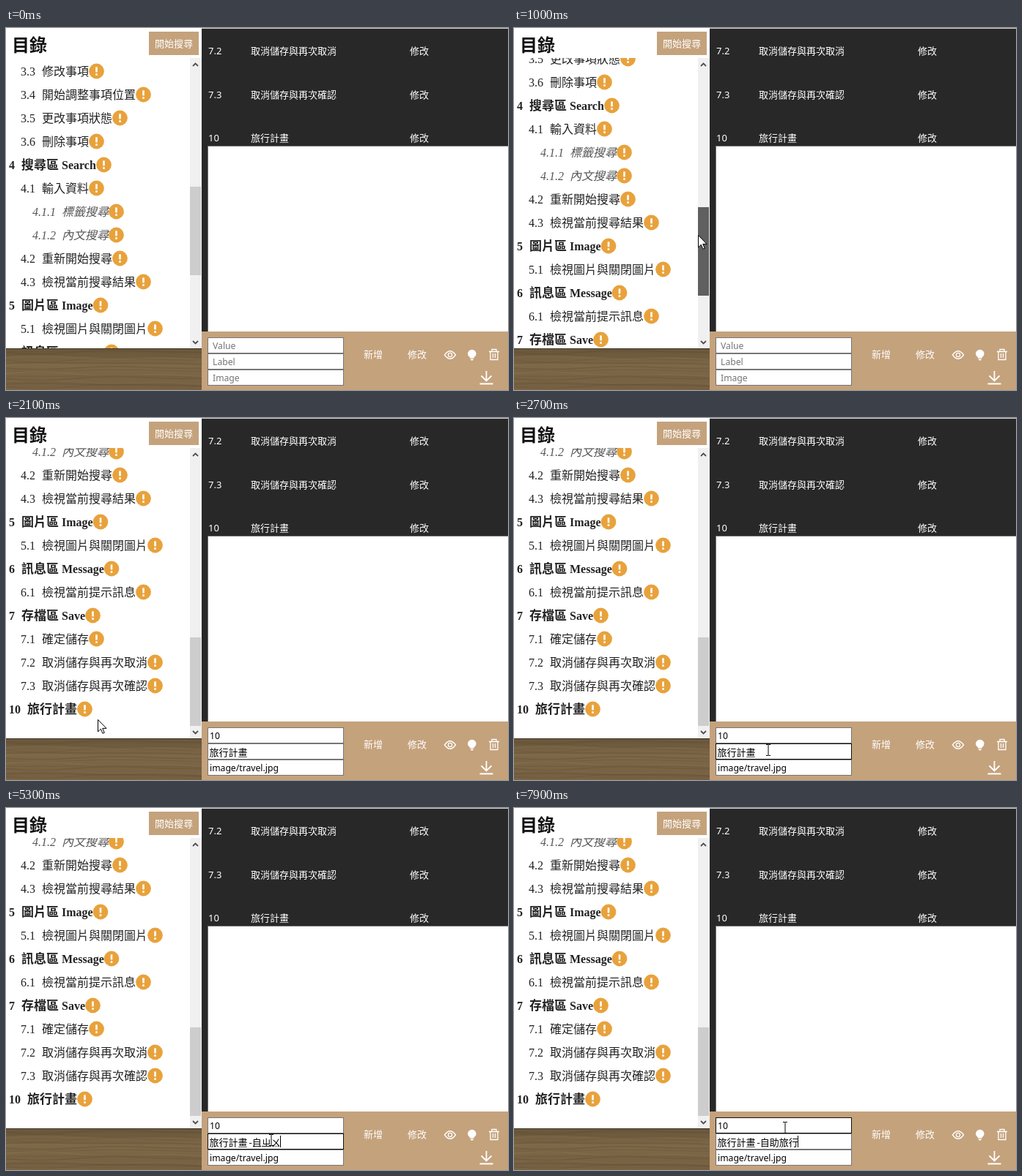
Recreate the animation shown at these times as an HTML page. Size 685 px wide and 495 px high, loop 8000 ms.

```html
<!DOCTYPE html>
<html lang="zh-TW">
<head>
<meta charset="utf-8">
<style>
html, body { margin: 0; width: 100%; height: 100%; overflow: hidden; background: #fff; }
svg { display: block; width: 685px; height: 495px; }
text { font: 13px "Noto Sans", "Noto Sans CJK TC", "Noto Sans CJK", sans-serif; white-space: pre; }
.serif { font: 16px "Liberation Serif", "Noto Sans CJK TC", "Noto Sans CJK", serif; fill: #222; }
.l1 { font-weight: bold; }
.l1 .han { font-size: 17px; }
.l3 { font-style: italic; fill: #555; }
.title { font-size: 24px; font-weight: bold; fill: #111; }
.light { fill: #fff; }
.small { font-size: 12.2px; }
.line { fill: none; stroke: #fff; stroke-width: 1.3; }
</style>
</head>
<body>
<svg viewBox="0 0 685 495">
  <defs>
    <clipPath id="view"><rect y="41" width="251" height="397"/></clipPath>
    <clipPath id="plank"><rect y="438" width="267" height="57"/></clipPath>
    <linearGradient id="brown" x2="0" y2="1">
      <stop offset="0" stop-color="#665439"/><stop offset=".4" stop-color="#7d6848"/><stop offset="1" stop-color="#745f42"/>
    </linearGradient>
    <g id="bang">
      <circle r="10.4" fill="#e8a23c"/>
      <path d="M0-5.6V1.4" stroke="#fff" stroke-width="2.6"/>
      <circle cy="4.6" r="1.5" fill="#fff"/>
    </g>
  </defs>

  <rect width="267" height="438" fill="#fff"/>
  <g clip-path="url(#view)"><g id="rows"></g></g>
  <text class="serif title" x="8" y="32">目錄</text>
  <rect x="195" y="5" width="68" height="32" fill="#c4a27c"/>
  <text class="light" x="203" y="26">開始搜尋</text>

  <rect x="251" y="41" width="16" height="397" fill="#f0f0f0"/>
  <rect id="thumb" x="251" width="15" height="121"/>
  <path d="M255 52l3.5-3.5 3.5 3.5M255 428l3.5 3.5 3.5-3.5" fill="none" stroke="#505050" stroke-width="1.8"/>

  <g id="wood" clip-path="url(#plank)">
    <rect y="438" width="267" height="57" fill="url(#brown)"/>
  </g>
  <path d="M0 438.5H267" stroke="#3f3528"/>

  <rect x="267" width="418" height="415" fill="#282828"/>
  <path d="M267 .5H685" stroke="#d0d0d0"/>
  <rect x="275.5" y="161.5" width="420" height="254" fill="#fff" stroke="#767676"/>
  <rect x="267" y="415" width="418" height="80" fill="#c4a27c"/>
  <g id="table"></g>

  <g class="line">
    <path d="M598.5 447q7.5-10.5 15 0q-7.5 10.5-15 0z"/><circle cx="606" cy="447" r="2.6"/>
    <path d="M659 442.5h14M663 442v-2.5h6v2.5M661 442.5v11h10v-11M664.5 445v6M667.5 445v6"/>
    <path d="M655.5 469v13M648.5 475.5l7 7 7-7M646.5 486.5h18" stroke-width="1.8"/>
  </g>
  <path d="M633 450.5q-3-2-3-5a5.8 5.8 0 0 1 11.600 0q0 3-3 5v1h-5.600zM633.500 452.500h4.600l-1 2h-2.600z" fill="#fff"/>

  <g id="fields"></g>
  <text id="label" x="277.5" y="462"></text>
  <text id="typed" x="331.5" y="462"></text>
  <path id="under" stroke="#222" stroke-dasharray="1 1"/>
  <path id="caret" stroke="#000"/>

  <g id="arrow"><path d="M.5.5v16.500l3.800-3.700 2.700 6 2.300-1-2.600-5.900h5.300z" fill="#fff" stroke="#000"/></g>
  <g id="beam"><path d="M-3-7.500h2.500l.5.5.5-.5h2.500M0-7v14M-3 7.500h2.500l.5-.5.5.5h2.500" fill="none" stroke="#000"/></g>
  <g id="hand"><path d="M-1.500 10V1.500q1.500-2.500 3 0V6q6 0 8 2.500v5l-2 5h-7l-5.500-7.500q0-2.500 3-.500z" fill="#fff" stroke="#000"/></g>
</svg>
<script>
const $ = id => document.getElementById(id);
const set = (el, attrs) => { for (const k in attrs) el.setAttribute(k, attrs[k]); return el; };
const add = (parent, tag, attrs, text = '') => {
  const el = set(document.createElementNS('http://www.w3.org/2000/svg', tag), attrs);
  el.textContent = text;
  return parent.appendChild(el);
};

// number, Chinese title, Latin title and its width (headings only)
const toc = [
  ['3.3', '修改事項'], ['3.4', '開始調整事項位置'], ['3.5', '更改事項狀態'], ['3.6', '刪除事項'],
  ['4', '搜尋區', ' Search', 51], ['4.1', '輸入資料'], ['4.1.1', '標籤搜尋'], ['4.1.2', '內文搜尋'],
  ['4.2', '重新開始搜尋'], ['4.3', '檢視當前搜尋結果'],
  ['5', '圖片區', ' Image', 46.5], ['5.1', '檢視圖片與關閉圖片'],
  ['6', '訊息區', ' Message', 61.5], ['6.1', '檢視當前提示訊息'],
  ['7', '存檔區', ' Save', 36], ['7.1', '確定儲存'], ['7.2', '取消儲存與再次取消'], ['7.3', '取消儲存與再次確認'],
  ['10', '旅行計畫', '', 0]
];
toc.forEach(([num, han, latin = '', extra = 0], i) => {
  const level = num.split('.').length, y = 59 + 32 * i;
  const x = 16 * level - 12;
  const x2 = x + 8 * num.replaceAll('.', '').length + 4 * (level - 1) + (level == 3 ? 8 : 9);
  const cls = 'serif l' + level;
  add($('rows'), 'text', { class: cls, x, y: y + 6 }, num);
  const t = add($('rows'), 'text', { class: cls, x: x2, y: y + 6 });
  add(t, 'tspan', { class: 'han' }, han);
  add(t, 'tspan', {}, latin);
  const end = x2 + han.length * (level == 1 ? 17 : 16) + extra;
  add($('rows'), 'use', { href: '#bang', x: end + 10.5, y });
});

for (let i = 0; i < 16; i++) {
  const y = 440 + i * 3.6, bend = 5 * Math.sin(i * 1.9);
  add($('wood'), 'path', {
    d: `M0 ${y}q45 ${bend} 90 0t90 ${-bend / 2}t90 2`, fill: 'none',
    stroke: i % 3 ? '#5d4a31' : '#8a7550', 'stroke-width': 1 + i % 2, opacity: .3
  });
}

const light = (x, y, s) => add($('table'), 'text', { class: 'light', x, y }, s);
[['7.2', '取消儲存與再次取消', 36], ['7.3', '取消儲存與再次確認', 96], ['10', '旅行計畫', 155]].forEach(([n, s, y]) => {
  light(276, y, n);
  light(334, y, s);
  light(551, y, '修改');
});
light(488, 451, '新增');
light(548, 451, '修改');

const fields = [['Value', '10'], ['Label', ''], ['Image', 'image/travel.jpg']].map(([hint, value], i) => ({
  hint, value,
  box: add($('fields'), 'rect', { x: 275.5, y: 423.5 + 22 * i, width: 185, height: 21, fill: '#fff' }),
  text: add($('fields'), 'text', { class: 'small', y: 439 + 22 * i })
}));

const path = [
  [100, 672, 170], [500, 293, 222], [700, 259, 250], [900, 253, 253], [1200, 248, 343],
  [1500, 185, 372], [1800, 80, 396], [2000, 76, 397], [2100, 125, 412], [2300, 235, 470],
  [2700, 347, 454], [3100, 362, 454], [7600, 362, 454], [7900, 370, 437], [8000, 370, 437]
];
const typing = [
  [0, ''], [3800, '-'], [4400, '-ㄗ'], [4600, '-自'], [4900, '-自ㄓ'], [5000, '-自ㄓㄨ'], [5400, '-自助'], [5700, '-自助ㄌ'],
  [5900, '-自助ㄌㄩ'], [6000, '-自助旅'], [6300, '-自助旅ㄒㄧ'], [6400, '-自助旅ㄒㄧㄥ'], [6600, '-自助旅行']
];
const caretOn = [[3000, 3500], [3800, 4000], [4400, 7300], [7800, 8000]];

const within = (t, a, b) => t >= a && t < b;
const show = (el, on) => { el.style.display = on ? '' : 'none'; };
const follow = t => {
  const i = Math.max(1, path.findIndex(p => p[0] > t));
  const [t0, x0, y0] = path[i - 1], [t1, x1, y1] = path[i];
  const k = Math.max(0, (t - t0) / (t1 - t0));
  return [x0 + (x1 - x0) * k, y0 + (y1 - y0) * k];
};

function draw(t) {
  const scroll = t < 900 ? 0 : 3 + 234 * Math.min(1, (t - 900) / 300);
  set($('rows'), { transform: `translate(0 ${-Math.round(scroll)})` });
  set($('thumb'), { y: Math.round(217 + scroll * 83 / 237), fill: within(t, 700, 1300) ? '#606060' : '#cdcdcd' });

  const [x, y] = follow(t).map(Math.round);
  const filled = t >= 2000;
  fields.forEach((f, i) => {
    const top = 423 + 22 * i, hover = x > 275 && x < 461 && within(y, top, top + 22);
    set(f.box, { stroke: hover ? '#111' : '#767676' });
    set(f.text, { x: filled ? 278 : 282, fill: filled ? '#000' : '#757575' });
    f.text.textContent = filled ? f.value : f.hint;
  });

  const typed = typing.findLast(s => s[0] <= t)[1];
  $('label').textContent = filled ? '旅行計畫' : '';
  $('typed').textContent = typed;
  const end = typed ? 322.5 + 13 * typed.length : 330.5;
  set($('caret'), { d: `M${end} 448v16` });
  show($('caret'), caretOn.some(([a, b]) => within(t, a, b)));
  set($('under'), { d: `M337 462.5H${end - 2.5}` });
  show($('under'), within(t, 4400, 6900));

  const kind = within(t, 1500, 2100) ? 'hand' : x > 275 ? 'beam' : 'arrow';
  for (const id of ['arrow', 'beam', 'hand']) {
    show($(id), t >= 100 && id == kind);
    set($(id), { transform: `translate(${x} ${y})` });
  }
}

const start = performance.now();
function loop() {
  draw(Math.floor((performance.now() - start) % 8000 / 100) * 100);
  requestAnimationFrame(loop);
}
loop();
</script>
</body>
</html>
```
